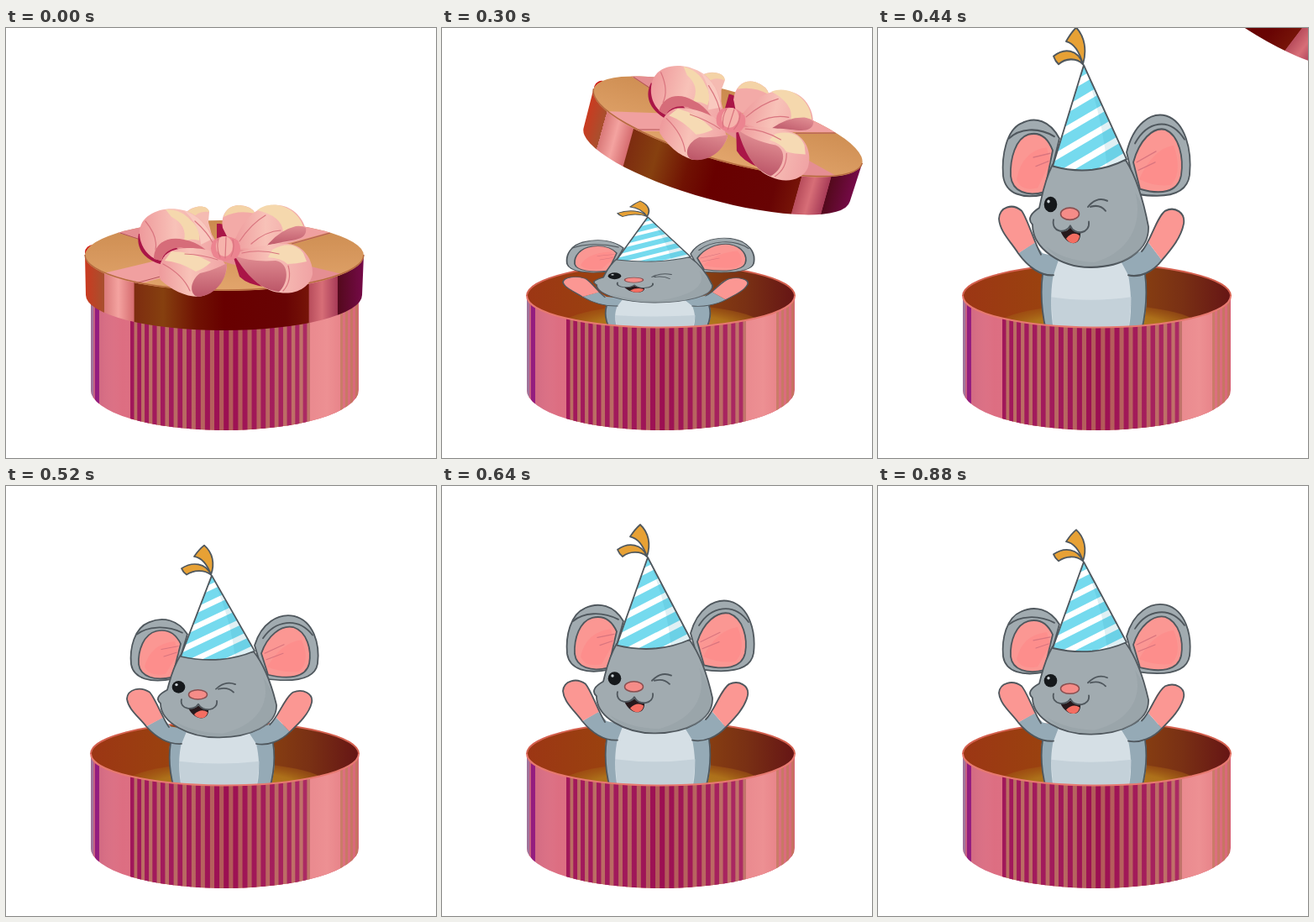
Write an HTML page that moves like this. It is 512 px wide and 512 px high and loops after 0.9 s.

```html
<!DOCTYPE html>
<html lang="en">
<head>
<meta charset="utf-8">
<title>Gift box surprise</title>
<style>
  html, body { margin: 0; width: 100%; height: 100%; overflow: hidden; background: #fff; }
  svg { display: block; width: 100vw; height: 100vh; }
  .ink { stroke: #4f575d; stroke-width: 1.8; stroke-linejoin: round; stroke-linecap: round; }
  .line { fill: none; }
  .grey { fill: #a1abb0; }
  .pink { fill: #fb9793; }
  .blue { fill: #95aab6; }
  .fold { fill: none; stroke: #d9757f; stroke-width: 1.2; stroke-linecap: round; }
</style>
</head>
<body>
<svg viewBox="0 0 512 512">
  <defs>
    <linearGradient id="inside">
      <stop offset="0" stop-color="#9c3614"/><stop offset=".3" stop-color="#9a420f"/>
      <stop offset=".6" stop-color="#8d4510"/><stop offset=".82" stop-color="#793014"/>
      <stop offset="1" stop-color="#661515"/>
    </linearGradient>
    <radialGradient id="floor">
      <stop offset="0" stop-color="#b58420"/><stop offset=".7" stop-color="#ad701a"/>
      <stop offset="1" stop-color="#a25a14" stop-opacity=".5"/>
    </radialGradient>
    <linearGradient id="shade">
      <stop offset="0" stop-color="#70206a" stop-opacity=".2"/>
      <stop offset=".12" stop-color="#fff" stop-opacity=".02"/>
      <stop offset=".5" stop-color="#900840" stop-opacity=".16"/>
      <stop offset=".88" stop-color="#ffd0c0" stop-opacity=".18"/>
      <stop offset="1" stop-color="#c04050" stop-opacity=".12"/>
    </linearGradient>
    <linearGradient id="rim" gradientUnits="userSpaceOnUse" x1="94" x2="426" y1="0" y2="0">
      <stop offset="0" stop-color="#cb3a20"/><stop offset=".068" stop-color="#a8502e"/>
      <stop offset=".068" stop-color="#d97878"/><stop offset=".12" stop-color="#f4a3a0"/>
      <stop offset=".175" stop-color="#d66d70"/><stop offset=".178" stop-color="#7d2c10"/>
      <stop offset=".28" stop-color="#86400f"/><stop offset=".4" stop-color="#701203"/>
      <stop offset=".5" stop-color="#680000"/><stop offset=".72" stop-color="#680404"/>
      <stop offset=".802" stop-color="#761408"/><stop offset=".804" stop-color="#b84d5c"/>
      <stop offset=".85" stop-color="#d76e77"/><stop offset=".905" stop-color="#a83c58"/>
      <stop offset=".907" stop-color="#54091c"/><stop offset="1" stop-color="#760a49"/>
    </linearGradient>
    <linearGradient id="top" x2="0" y2="1">
      <stop offset="0" stop-color="#cb8a4e"/><stop offset="1" stop-color="#e2a56c"/>
    </linearGradient>
    <linearGradient id="silk">
      <stop offset="0" stop-color="#ee9a9c"/><stop offset=".45" stop-color="#f8c2b8"/>
      <stop offset="1" stop-color="#f0a3a4"/>
    </linearGradient>
    <linearGradient id="inner" x2="0" y2="1">
      <stop offset="0" stop-color="#e08d92"/><stop offset="1" stop-color="#bc5668"/>
    </linearGradient>
    <clipPath id="wall"><path d="M101 319A159.500 38 0 0 0 420 319V431A159.500 48 0 0 1 101 431Z"/></clipPath>
    <clipPath id="lidTop"><ellipse cx="260" cy="271" rx="166" ry="42"/></clipPath>
    <clipPath id="cone"><path d="M245 92L296 187Q255 205 208 194Z"/></clipPath>
  </defs>

  <ellipse cx="260.500" cy="319" rx="159" ry="38" fill="url(#inside)"/>
  <ellipse cx="262" cy="361" rx="128" ry="32" fill="url(#floor)"/>
  <path d="M101 319A159.500 38 0 0 1 420 319" fill="none" stroke="#d5604f" stroke-width="2"/>

  <g id="mouse">
    <path class="blue" d="M200 284C192 304 193 330 200 360H314C321 340 323 312 314 284Z"/>
    <path fill="#d5dfe5" d="M214 286C204 312 205 338 209 360H298C304 338 301 308 293 286Z"/>
    <path fill="#b9c8d2" d="M206 326Q252 332 302 326L298 360H209Z" opacity=".6"/>
    <path class="ink line" d="M196 303Q192 330 200 360M318 303Q322 330 314 360"/>

    <g class="ink">
      <path class="grey" d="M216 166C205 148 187 143 170 151C153 158 147 183 149 204C152 222 172 228 200 222Z"/>
      <path class="pink" d="M208 178C202 165 192 159 179 162C164 166 157 186 158 204C160 220 178 225 198 220Z"/>
      <path class="line" d="M156 166C168 156 190 154 210 164"/>
      <path class="grey" d="M296 180C304 152 324 139 343 143C366 149 374 178 371 203C368 222 344 227 308 222Z"/>
      <path class="pink" d="M304 190C311 168 327 154 342 157C359 163 364 186 361 203C357 221 336 223 312 217Z"/>
      <path class="line" d="M306 171C320 149 347 143 365 167"/>
    </g>
    <path d="M165 207Q172 178 201 175L205 190L190 216Q170 220 165 207M311 207Q328 176 352 173Q363 200 349 213Q329 215 311 207" fill="#ff7f83" opacity=".4"/>
    <path d="M205 181L185 185M203 189L188 194M308 190L331 179M310 198L330 190" class="fold"/>

    <path class="blue" d="M186 271L167 282C179 296 194 305 209 304L216 286L196 282ZM322 271L338 289C328 300 312 307 298 304L288 288L312 280Z"/>
    <path class="pink" d="M187 271C181 257 177 247 171 239C160 231 145 235 144 247C145 260 158 270 167 282ZM322 271C328 257 332 245 342 239C354 234 366 241 364 252C361 266 349 278 338 289Z"/>
    <path class="ink line" d="M194 283C186 271 178 247 171 239C160 231 145 235 144 247C145 260 158 270 167 282C179 296 194 305 209 304"/>
    <path class="ink line" d="M314 280C324 271 332 245 342 239C354 234 366 241 364 252C361 266 349 278 338 289C328 300 312 307 298 304"/>
    <path class="ink grey" d="M208 192C197 211 195 226 192 236C183 241 177 247 184 253C184 278 219 296 252 296C290 296 323 281 322 255C317 233 309 207 295 188Z"/>
    <path d="M306 220C316 249 302 280 258 291Q223 290 200 275Q218 295 253 295C302 294 322 279 321 255Q316 233 306 220Z" fill="#8d989f" opacity=".35"/>

    <circle cx="205.500" cy="232.500" r="7.800" fill="#15181b"/>
    <circle cx="203" cy="229.500" r="1.700" fill="#c9d0d4"/>
    <path class="ink line" d="M250 235Q261 224 273 229M253 235Q264 232 271 239"/>
    <path fill="#27191c" d="M217 259Q224 261 229 256Q234 261 241 261C242 275 225 276 217 259Z"/>
    <path fill="#f46e62" d="M224 267Q232 259 240 264C239 273 229 274 224 267Z"/>
    <path class="ink line" d="M209 248C206 261 224 263 229 254C234 265 253 262 251 250"/>
    <ellipse cx="228.500" cy="242" rx="11" ry="6" fill="#f58c88" stroke="#8a4f50" stroke-width="1.500"/>

    <g clip-path="url(#cone)">
      <path fill="#75daee" d="M200 80H300V210H200Z"/>
      <g id="stripes" stroke="#fff" stroke-width="7"></g>
      <path d="M245 92L296 187L273 197Q268 145 245 92Z" fill="#3197b5" opacity=".15"/>
    </g>
    <path class="ink line" d="M245 92L296 187Q255 205 208 194Z"/>
    <g class="ink" fill="#e7a135">
      <path d="M244 91C249 77 246 63 236 54Q230 59 224 68C234 70 240 79 244 91Z"/>
      <path d="M244 91C238 76 222 74 209 83Q211 88 215 91C223 85 236 84 244 91Z"/>
    </g>
  </g>

  <g clip-path="url(#wall)">
    <path fill="#dc6b7f" d="M100 310H421V482H100Z"/>
    <g id="bars"></g>
    <path fill="url(#shade)" d="M100 310H421V482H100Z"/>
  </g>
  <path d="M101 319A159.500 37.500 0 0 0 420 319" fill="none" stroke="#e77970" stroke-width="2"/>

  <g id="lid">
    <ellipse cx="104" cy="267" rx="10" ry="9" fill="#cf1410"/>
    <path fill="url(#rim)" d="M94 270A166 42 0 0 0 426 270L424 318A164.500 42 0 0 1 95 318Z"/>
    <ellipse cx="260" cy="271" rx="166" ry="42" fill="url(#top)"/>
    <g clip-path="url(#lidTop)">
      <path fill="#f0a0a0" d="M112 293L154 306L386 243L358 234Z"/>
      <path fill="#e58e92" d="M400 293L360 306L130 243L158 234Z"/>
      <path fill="none" stroke="#b45559" d="M154 304L250 278M360 304L282 278M136 244L175 257M386 244L340 257"/>
    </g>
    <path d="M94 270A166 42 0 0 0 426 270" fill="none" stroke="#b66a3f" stroke-width="1.500"/>

    <path fill="#aa1547" d="M158 245C154 265 168 278 188 282L214 271L190 251ZM251 233Q261 232 263 239L265 254L251 252ZM270 270L278 296Q288 306 309 308L300 283Z"/>
    <path fill="#f5bbb2" d="M215 219C223 211 240 210 242 219L241 231L247 254L222 247Z"/>
    <path fill="#f4d3a6" d="M216 219C224 211 240 210 242 219Q229 217 222 227Z"/>
    <path fill="#f3aaa7" d="M258 238C255 221 265 211 278 211Q293 212 297 221L290 243L266 254Z"/>
    <path fill="#f4d3a6" d="M259 225Q263 211 278 211Q292 212 297 221Q276 216 259 225Z"/>

    <path fill="url(#silk)" d="M253 261C243 238 229 221 211 217C188 211 159 221 159 244C159 260 170 275 185 277C190 258 211 251 228 263Q241 270 253 261Z"/>
    <path fill="#f5d8ad" d="M190 216Q209 216 220 229Q232 239 230 253Q219 250 212 254Q216 234 197 225Z"/>
    <path fill="#f9c9bf" d="M211 217Q236 225 246 251L232 258Q230 232 211 217Z"/>
    <path fill="#d66c79" d="M176 275C176 256 193 247 212 252Q226 254 239 265Q220 265 208 261Q189 263 185 277Z"/>
    <path class="fold" d="M166 230Q181 248 178 264M225 230Q243 246 248 260"/>

    <path fill="url(#silk)" d="M270 260C278 235 293 214 317 211C337 208 354 224 357 241C359 255 333 253 315 260Q292 266 270 260Z"/>
    <path fill="#f5d8ad" d="M299 217C317 203 346 213 354 236Q339 237 330 243Q329 224 299 217Z"/>
    <path fill="url(#inner)" d="M357 238C360 257 331 251 310 260Q325 241 345 236Q352 235 357 238Z"/>
    <path class="fold" d="M278 254Q292 233 309 223M292 257Q309 242 327 241"/>

    <path fill="url(#silk)" d="M252 268C234 261 209 260 196 266C183 272 180 290 184 300C196 311 213 320 229 320C246 318 261 303 263 284Z"/>
    <path fill="#f6dab4" d="M197 266Q222 266 244 279Q235 287 226 290Q206 278 189 277Z"/>
    <path fill="url(#inner)" d="M263 280C263 304 245 320 228 320C217 316 220 300 231 292Q246 289 263 280Z"/>
    <path class="fold" d="M187 281Q211 294 219 313M213 269Q234 270 252 276"/>

    <path fill="url(#silk)" d="M272 269C292 261 316 256 336 257C356 259 366 278 365 293C362 309 345 318 326 315C303 313 288 293 272 269Z"/>
    <path fill="#f6dab4" d="M317 264Q341 251 354 268L358 278Q345 281 335 281Q328 274 312 273Z"/>
    <path fill="url(#inner)" d="M272 271Q291 279 321 277C339 280 336 305 325 314C301 311 287 294 272 271Z"/>
    <path class="fold" d="M281 268Q302 263 325 269M336 283Q341 301 330 313"/>

    <path fill="#ec8490" d="M247 253Q260 243 276 253Q283 265 274 274Q259 281 247 272Q241 262 247 253Z"/>
    <ellipse cx="260" cy="260" rx="10" ry="12" fill="#f6b3ac"/>
    <path class="fold" d="M253 251Q250 263 255 273M262 249L261 274M270 252Q273 263 268 272"/>
  </g>
</svg>
<script>
  const $ = id => document.getElementById(id);
  const LOOP = 900, STEP = 20, OPEN = 220, FULL = 380;

  const bar = (x, w, fill) => `<rect x="${x}" y="310" width="${w}" height="172" fill="${fill}"/>`;
  const around = a => 260 + 160 * Math.sin(a);

  // Narrow stripes follow the curve of the box; two plain bands are its ribbon.
  function drawBars() {
    const pitch = .07;
    let out = bar(101, 3, '#a984a5') + bar(104, 2, '#d46682') + bar(106, 5, '#94137c');
    out += bar(148, 214, '#b9685d');
    for (let a = -.775; a < .69; a += pitch) {
      const x = around(a);
      out += bar(x, (around(a + pitch) - x) * .54, '#9e1055');
    }
    out += bar(362, 36, '#e98289');
    for (let x = 398; x < 420; x += 6) out += bar(x, 3, '#c67861');
    $('bars').innerHTML = out;
  }

  function drawStripes() {
    let out = '';
    for (let y = 106; y < 240; y += 20.5) out += `<path d="M195 ${y + 25}L305 ${y - 30}"/>`;
    $('stripes').innerHTML = out;
  }

  // Straight rise, then a damped bounce around full height.
  function stretch(t) {
    if (t < FULL) return Math.max(0, (t - OPEN) / (FULL - OPEN));
    const u = (t - FULL) / 120;
    return 1 + .259 * Math.pow(.48, u) * Math.sin(Math.PI * u);
  }

  function pose(time) {
    const t = Math.floor(time % LOOP / STEP) * STEP;
    const n = Math.max(0, (t - OPEN) / STEP + 1);
    const s = stretch(t);
    $('lid').setAttribute('transform',
      `translate(${260 + 16.1 * n} ${270 - 30.7 * n}) rotate(${3.1 * n}) translate(-260 -270)`);
    $('lid').style.display = n > 15 ? 'none' : '';
    $('mouse').setAttribute('transform', `translate(0 ${358 * (1 - s)}) scale(1 ${s})`);
    $('mouse').style.display = s > 0 ? '' : 'none';
  }

  drawBars();
  drawStripes();
  const start = performance.now();
  function tick() {
    pose(performance.now() - start);
    requestAnimationFrame(tick);
  }
  tick();
</script>
</body>
</html>
```
